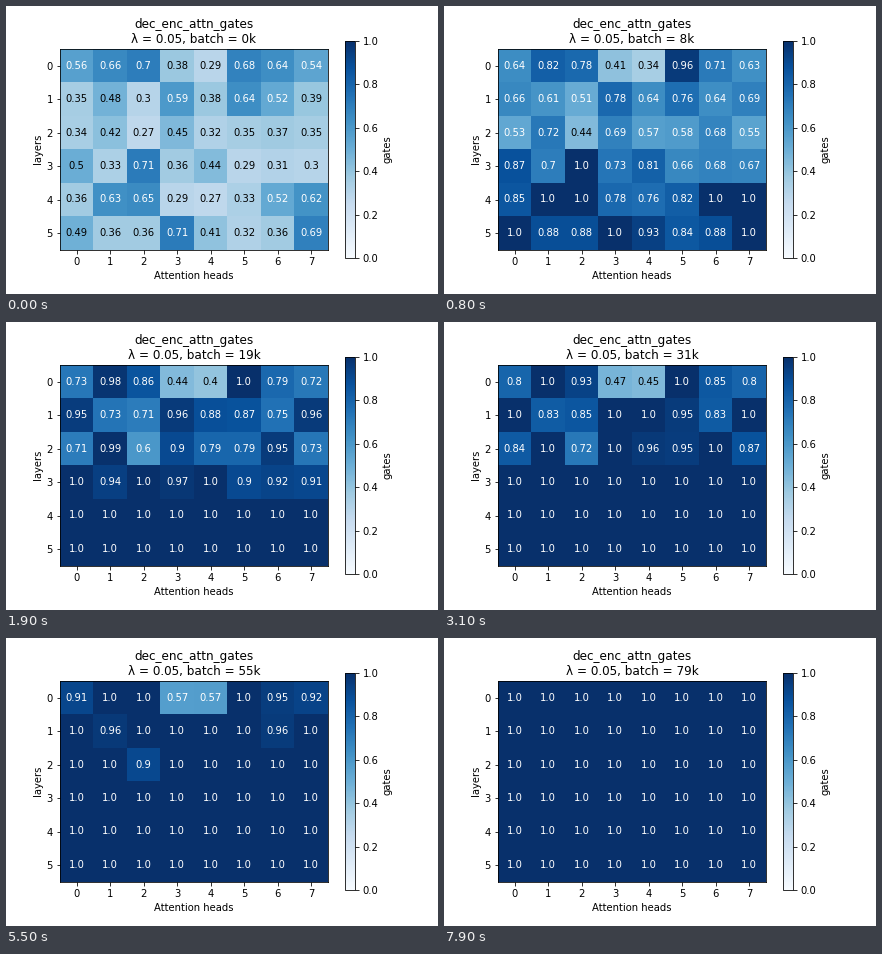
Recreate the animation shown at these times as a matplotlib script. Size 432 by 288 pixels, loop 8000 ms.

```python
import numpy as np
import matplotlib.pyplot as plt
from matplotlib.animation import FuncAnimation

FRAMES, INTERVAL = 80, 100
LAYERS, HEADS = 6, 8
REF = 19                    # batch (in thousands) at which the gains are given
SURGE_START, SURGE_END = 31, 72

# Gate values before training.
start = np.array([
    [.56, .66, .70, .38, .29, .68, .64, .54],
    [.35, .48, .30, .59, .38, .64, .52, .39],
    [.34, .42, .27, .45, .32, .35, .37, .35],
    [.50, .33, .71, .36, .44, .29, .31, .30],
    [.36, .63, .65, .29, .27, .33, .52, .62],
    [.49, .36, .36, .71, .41, .32, .36, .69]])

# Rise up to REF: individual in the first layers, shared by all heads below.
gain = np.ones((LAYERS, HEADS))
gain[0] = .165, .32, .16, .064, .11, .57, .145, .182
gain[1] = .60, .255, .405, .37, .50, .23, .228, .57
gain[2] = .365, .575, .33, .45, .47, .44, .585, .38
gain[3:] *= np.c_[[.61, .81, .86]]

# A smaller scale makes a layer rise early and level off sooner.
scale = np.c_[[25, 15, 15, 5, 5, 5]]


def gates(batch):
    """Logarithmic growth, then a late surge that opens every gate."""
    growth = np.log1p(batch / scale) / np.log1p(REF / scale)
    value = np.minimum(start + gain * growth, 1)
    u = np.clip((batch - SURGE_START) / (SURGE_END - SURGE_START), 0, 1)
    return value + (1 - value) * u ** 4


plt.rcParams.update({"font.family": "DejaVu Sans", "font.size": 10})
fig, ax = plt.subplots(figsize=(6, 4), dpi=72)
fig.subplots_adjust(left=0.125, right=0.9, bottom=0.125, top=0.88)

image = ax.imshow(start, cmap="Blues", vmin=0, vmax=1, interpolation="nearest")
fig.colorbar(image, ax=ax, label="gates")
ax.set_xticks(range(HEADS))
ax.set_yticks(range(LAYERS))
ax.set_xlabel("Attention heads")
ax.set_ylabel("layers")
title = ax.set_title("", fontsize=12)
labels = [ax.text(j, i, "", ha="center", va="center")
          for i in range(LAYERS) for j in range(HEADS)]


def update(batch):
    values = gates(batch)
    image.set_data(values)
    title.set_text(f"dec_enc_attn_gates\nλ = 0.05, batch = {batch}k")
    for label, value in zip(labels, values.flat):
        shown = round(float(value), 2)
        label.set_text(str(shown))
        label.set_color("white" if shown > 0.5 else "black")


anim = FuncAnimation(fig, update, frames=FRAMES, interval=INTERVAL,
                     init_func=lambda: update(0), repeat=True, repeat_delay=0)
plt.show()
```
